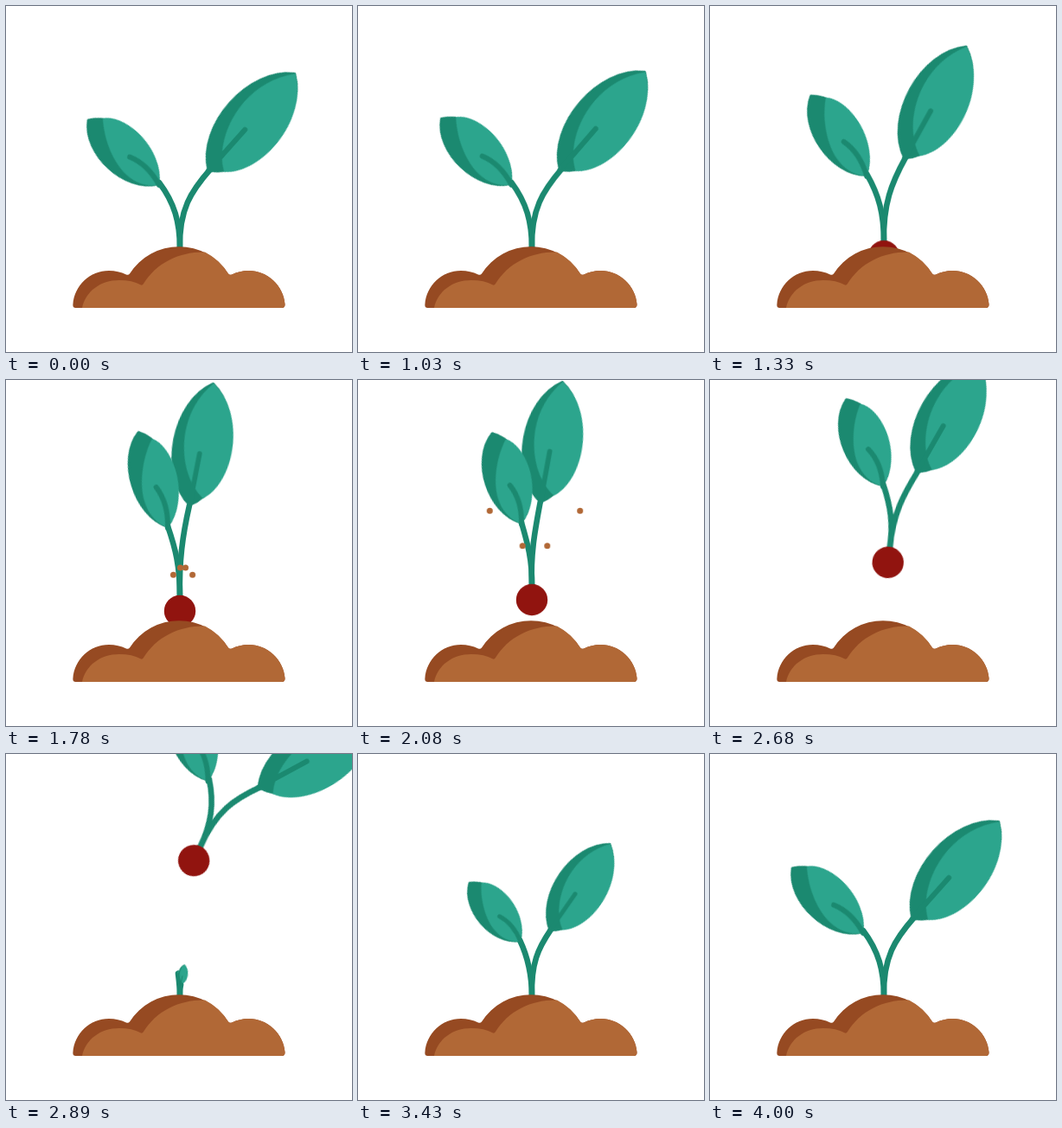
An HTML page that plays this animation: 400x400 px, repeating every 4.03 s.

```html
<!DOCTYPE html>
<html lang="en">
<head>
<meta charset="utf-8">
<title>Harvest loop</title>
<style>
  html, body { margin: 0; width: 100%; height: 100%; overflow: hidden; background: #fff; }
  svg { display: block; width: 100%; height: 100%; }

  .stem, .vein { fill: none; stroke: #1b8970; stroke-width: 6.6; stroke-linecap: round; }
  .vein { stroke-width: 6; }
  .blade { fill: #1b8970; stroke: #1b8970; stroke-width: 3; stroke-linejoin: round; }
  .shine { fill: #2ca58d; }
  .root { fill: #91140f; }
  .crumb { fill: #b16836; }

  .plant, .plant .stem, .plant .leaf, .crumb { animation: 4030ms linear infinite; }

  /* Grown plant: folds, is pulled out, then flies off */
  .old { animation-name: pull; }
  .old .stem.l { animation-name: fold-stem-l; }
  .old .stem.r { animation-name: fold-stem-r; }
  .old .leaf.l { animation-name: fold-leaf-l; }
  .old .leaf.r { animation-name: fold-leaf-r; }

  @keyframes pull {
    0%, 25.06% { transform: translate(201px, 297px) rotate(0deg); animation-timing-function: cubic-bezier(.4, .1, .8, .7); }
    44.17% { transform: translate(201px, 267px) rotate(0deg); animation-timing-function: ease-out; }
    59.8%, 62.03% { transform: translate(201px, 247.5px) rotate(0deg); animation-timing-function: cubic-bezier(.33, .1, .67, .45); }
    71.71% { transform: translate(217px, 124px) rotate(25deg); }
    78.16%, 100% { transform: translate(260px, -60px) rotate(40deg); }
  }
  @keyframes fold-stem-l {
    0%, 25.06%, 71.71%, 100% { d: path("M0 0 L0 -17 C0 -47 -6 -69 -24 -93"); }
    44.17% { d: path("M0 0 L0 -17 C0 -52 -5 -72 -14 -98"); animation-timing-function: ease-out; }
    59.8%, 62.03% { d: path("M0 0 L0 -16 C1 -42 -5 -62 -11 -85"); }
  }
  @keyframes fold-stem-r {
    0%, 25.06% { d: path("M0 0 L0 -17 C-1 -62 13 -83 35 -108"); }
    44.17% { d: path("M0 0 L0 -17 C-1 -57 3 -87 11 -122"); animation-timing-function: ease-out; }
    59.8%, 62.03% { d: path("M0 0 L0 -16 C-2 -52 4 -77 9 -108"); }
    71.71%, 100% { d: path("M0 0 L0 -17 C-1 -63 12 -84 34 -110"); }
  }
  @keyframes fold-leaf-l {
    0%, 25.06% { transform: translate(-24px, -90px) rotate(-47.5deg) scale(1, 1); }
    44.17% { transform: translate(-14px, -96px) rotate(-17deg) scale(1, 1.04); animation-timing-function: ease-out; }
    59.8%, 62.03% { transform: translate(-11px, -83.5px) rotate(-18.3deg) scale(1, .965); }
    71.71%, 100% { transform: translate(-24px, -90px) rotate(-44deg) scale(1, 1); }
  }
  @keyframes fold-leaf-r {
    0%, 25.06% { transform: translate(32px, -105.5px) rotate(41.7deg) scale(1, 1); }
    44.17% { transform: translate(11px, -121px) rotate(11deg) scale(.95, .953); animation-timing-function: ease-out; }
    59.8%, 62.03% { transform: translate(9px, -106.5px) rotate(10deg) scale(.95, .935); }
    71.71%, 100% { transform: translate(31px, -107px) rotate(36.5deg) scale(1, 1); }
  }

  /* Sprout: grows from the soil into the grown plant */
  .new { transform: translate(201px, 297px); }
  .new .stem.l { animation-name: grow-stem-l; }
  .new .stem.r { animation-name: grow-stem-r; }
  .new .leaf.l { animation-name: grow-leaf-l; }
  .new .leaf.r { animation-name: grow-leaf-r; }

  @keyframes grow-stem-l {
    0%, 68.73% { d: path("M0 0 L0 -4 C0 -6 0 -8 0 -10"); }
    71.71% { d: path("M0 0 L0 -17 C0 -25 -1 -35 -2 -43"); animation-timing-function: cubic-bezier(.33, .45, .67, .85); }
    85.11% { d: path("M0 0 L0 -17 C0 -42 -4 -61 -14 -82"); animation-timing-function: cubic-bezier(.33, .67, .67, 1); }
    100% { d: path("M0 0 L0 -17 C0 -47 -6 -69 -24 -93"); }
  }
  @keyframes grow-stem-r {
    0%, 68.73% { d: path("M0 0 L0 -4 C0 -6 0 -8 0 -10"); }
    71.71% { d: path("M0 0 L0 -17 C0 -22 0 -26 1 -30"); animation-timing-function: cubic-bezier(.33, .45, .67, .85); }
    85.11% { d: path("M0 0 L0 -17 C-1 -55 7 -72 22 -94"); animation-timing-function: cubic-bezier(.33, .67, .67, 1); }
    100% { d: path("M0 0 L0 -17 C-1 -62 13 -83 35 -108"); }
  }
  @keyframes grow-leaf-l {
    0%, 68.73% { transform: translate(0px, -10px) rotate(-10deg) scale(0, 0); }
    71.71% { transform: translate(-2px, -43px) rotate(-10deg) scale(.03, .03); animation-timing-function: cubic-bezier(.33, .45, .67, .85); }
    85.11% { transform: translate(-13px, -80px) rotate(-41deg) scale(.83, .81); animation-timing-function: cubic-bezier(.33, .67, .67, 1); }
    100% { transform: translate(-24px, -90px) rotate(-47.5deg) scale(1, 1); }
  }
  @keyframes grow-leaf-r {
    0%, 68.73% { transform: translate(0px, -10px) rotate(10deg) scale(0, 0); }
    71.71% { transform: translate(1px, -30px) rotate(10deg) scale(.155, .155); animation-timing-function: cubic-bezier(.33, .45, .67, .85); }
    85.11% { transform: translate(20px, -92px) rotate(34.8deg) scale(.82, .81); animation-timing-function: cubic-bezier(.33, .67, .67, 1); }
    100% { transform: translate(32px, -105.5px) rotate(41.7deg) scale(1, 1); }
  }

  /* Crumbs: steady sideways drift, parabolic height */
  .far { animation-name: drift, arc-far, shrink; }
  .near { animation-name: drift, arc-near; }

  @keyframes drift {
    0%, 42.18% { transform: translateX(0); }
    63.37%, 100% { transform: translateX(var(--dx)); }
  }
  @keyframes arc-far {
    0%, 42.17% { cy: 290px; }
    42.18% { cy: 265px; animation-timing-function: cubic-bezier(.33, .67, .67, 1); }
    52.78% { cy: 150px; animation-timing-function: cubic-bezier(.33, 0, .67, .33); }
    63.37% { cy: 265px; }
    63.38%, 100% { cy: 290px; }
  }
  @keyframes arc-near {
    0%, 42.17% { cy: 290px; }
    42.18% { cy: 265px; animation-timing-function: cubic-bezier(.33, .67, .67, 1); }
    48.76% { cy: 173px; animation-timing-function: cubic-bezier(.33, 0, .67, .33); }
    56.1%, 100% { cy: 295px; }
  }
  @keyframes shrink {
    0%, 61.5% { r: 3.5px; }
    63.37%, 100% { r: 0px; }
  }
</style>
</head>
<body>
<svg viewBox="0 0 400 400">
  <defs>
    <g id="leaf-l">
      <path class="blade" d="M0 -1.5 C-33 -24 -33 -89 0 -111 C33 -89 33 -24 0 -1.5 Z"/>
      <path class="shine" d="M13 -100 C-8 -80 -34 -28 -1 -1 L0 0 C35 -23.5 35 -84 13 -100 Z"/>
      <path class="vein" d="M0 0 Q9 -26 1 -47"/>
    </g>
    <g id="leaf-r">
      <path class="blade" d="M0 -1.5 C-44.5 -32 -44.5 -121 0 -151.5 C46 -121 46 -32 0 -1.5 Z"/>
      <path class="shine" d="M14.6 -12.5 C-20 -33 -40 -104 .5 -152 C48 -121 48 -38 14.6 -12.5 Z"/>
      <path class="vein" d="M0 -2 V-65"/>
    </g>
  </defs>

  <g class="plant new">
    <path class="stem l"/>
    <path class="stem r"/>
    <g class="leaf r"><use href="#leaf-r"/></g>
    <g class="leaf l"><use href="#leaf-l"/></g>
  </g>

  <g class="plant old">
    <path class="stem l"/>
    <path class="stem r"/>
    <g class="leaf r"><use href="#leaf-r"/></g>
    <g class="leaf l"><use href="#leaf-l"/></g>
    <circle class="root" r="18.2"/>
  </g>

  <circle class="crumb far" cx="204.5" r="3.5" style="--dx: -117px"/>
  <circle class="crumb far" cx="204.5" r="3.5" style="--dx: 117px"/>
  <circle class="crumb near" cx="204.5" r="3.5" style="--dx: -32px"/>
  <circle class="crumb near" cx="204.5" r="3.5" style="--dx: 32px"/>

  <path fill="#964a22" d="M80.5 349 Q77 349 77.4 345 C79 323 97 306 119 306 Q130 306 139 310.5 Q141.5 311.5 143 309.5
    A67.5 67.5 0 0 1 257 309.5 Q258.5 311.5 261 310.5 Q270 306 280.5 306 C302 306 321 323 322.5 345 Q322.5 349 319 349 Z"/>
  <path fill="#b16836" d="M88 349 C92 330 109 317 131 317 Q146 317 155.5 322.3 Q157.5 323.5 159 321 C174 297 200 284 230 284.5
    A67.5 67.5 0 0 1 257 309.5 Q258.5 311.5 261 310.5 Q270 306 280.5 306 C302 306 321 323 322.5 345 Q322.5 349 319 349 Z"/>
</svg>
</body>
</html>
```
